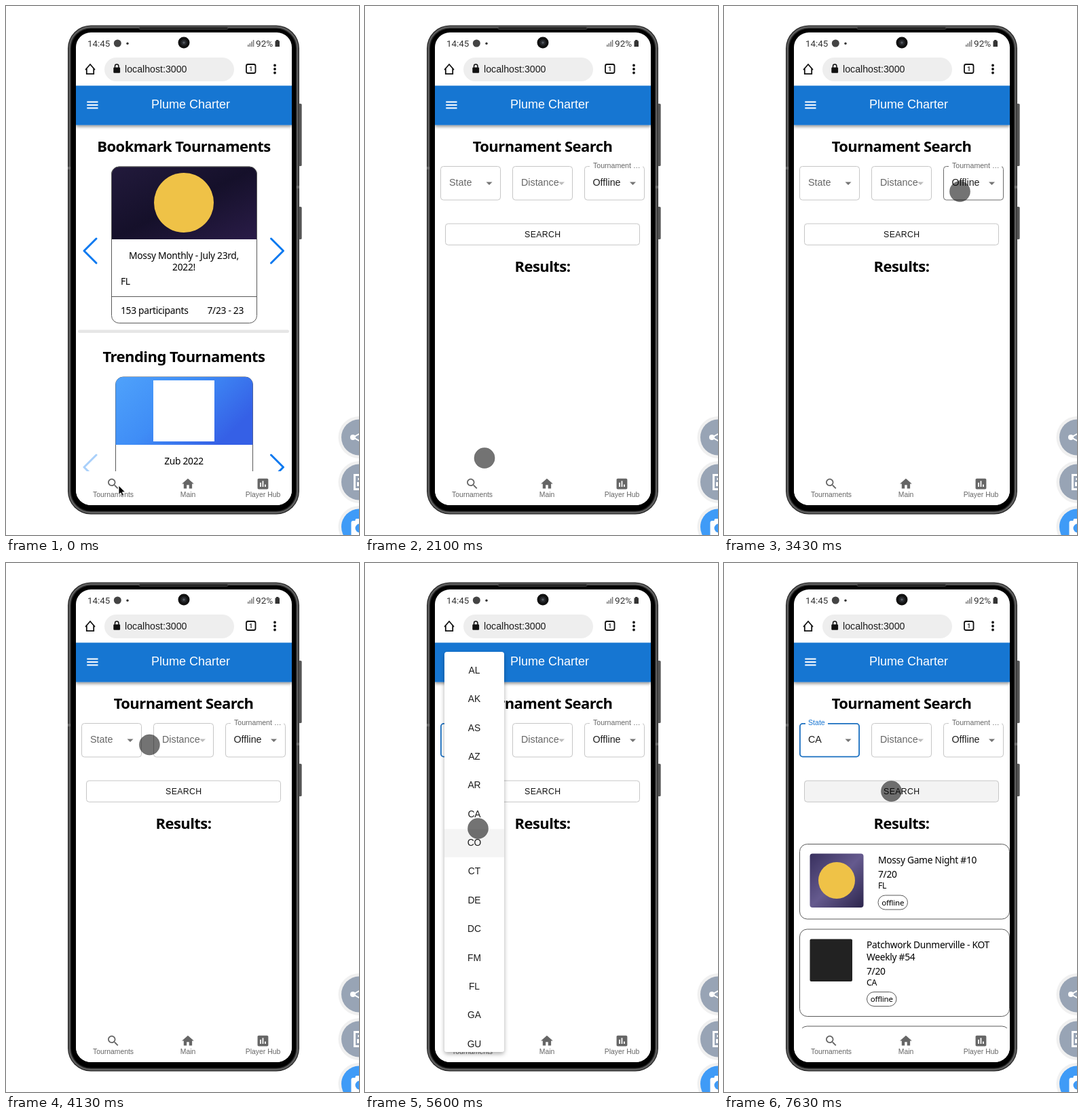
These frames come from a looping animation (520x780 px, 8 s). An HTML page:

```html
<!DOCTYPE html>
<html lang="en">
<head>
<meta charset="utf-8">
<title>Tournament search demo</title>
<style>
  html, body { margin: 0; width: 100%; height: 100%; overflow: hidden; background: #fff; }
  svg { display: block; }
  text { font-family: "Liberation Sans", Arial, sans-serif; white-space: pre; }
  .sys { font-family: Roboto, sans-serif; }
  .head { font: bold 22px "Noto Sans", sans-serif; letter-spacing: -.55px; text-anchor: middle; }
  .body { font: 13.8px "Noto Sans", sans-serif; letter-spacing: -.3px; }
  .small { font-size: 12.3px; }
  .chip { font-size: 11.5px; letter-spacing: -.2px; }
  .mid { text-anchor: middle; }
  .end { text-anchor: end; }
  .nav { font-size: 10.4px; fill: #666; text-anchor: middle; }
  .field { font-size: 14.3px; fill: #666; }
  .label { font-size: 10.6px; fill: #666; }
  .card { fill: #fff; stroke: #5a5a5a; }
  .chev { fill: none; stroke: #0a79f0; stroke-width: 3; stroke-linecap: round; stroke-linejoin: round; }
  .box { fill: none; stroke: #c6c6c6; }
</style>
</head>
<body>
<svg id="stage" width="520" height="780" viewBox="0 0 520 780">
  <defs>
    <clipPath id="screen"><rect x="103" y="39" width="318" height="697" rx="22"/></clipPath>
    <clipPath id="page"><rect x="103" y="117" width="318" height="569"/></clipPath>
    <clipPath id="cardA"><path d="M155.5 344V248a11 11 0 0 1 11-11h192a11 11 0 0 1 11 11v96z"/></clipPath>
    <clipPath id="cardB"><path d="M161.5 647V558a11 11 0 0 1 11-11h180a11 11 0 0 1 11 11v89z"/></clipPath>
    <linearGradient id="night" x1="0" y1="0" x2="1" y2="1">
      <stop offset="0" stop-color="#221a3c"/><stop offset=".5" stop-color="#15102a"/><stop offset="1" stop-color="#2a1c48"/>
    </linearGradient>
    <linearGradient id="dusk" x1="0" y1="0" x2="1" y2="1">
      <stop offset="0" stop-color="#38305e"/><stop offset=".5" stop-color="#655a8e"/><stop offset="1" stop-color="#2c254c"/>
    </linearGradient>
    <linearGradient id="sky" x1="0" y1="0" x2="1" y2=".5">
      <stop offset="0" stop-color="#4fa2fb"/><stop offset=".5" stop-color="#3f8df6"/><stop offset="1" stop-color="#3560e6"/>
    </linearGradient>
    <linearGradient id="metal" x1="0" x2="1">
      <stop offset="0" stop-color="#2b2b2b"/><stop offset=".5" stop-color="#6a6a6a"/><stop offset="1" stop-color="#333"/>
    </linearGradient>
    <filter id="drop" x="-20%" y="-20%" width="140%" height="140%">
      <feDropShadow dx="0" dy="3" stdDeviation="3" flood-opacity=".32"/>
    </filter>
    <filter id="bar" x="-5%" y="-10%" width="110%" height="140%">
      <feDropShadow dx="0" dy="2.5" stdDeviation="2" flood-opacity=".42"/>
    </filter>
  </defs>

  <g id="phone">
    <rect x="430" y="144" width="5.5" height="92" rx="1.5" fill="url(#metal)"/>
    <rect x="430" y="296" width="5.5" height="48" rx="1.5" fill="url(#metal)"/>
    <rect x="91" y="28.5" width="341" height="721" rx="34" fill="#262626"/>
    <rect x="93.5" y="31" width="336" height="716" rx="31.5" fill="none" stroke="#606060" stroke-width="2.4"/>
    <rect x="96" y="33.5" width="331" height="711" rx="29" fill="#000"/>
    <rect x="196" y="31" width="131" height="3.5" rx="1.7" fill="#222" stroke="#555" stroke-width=".6"/>
    <path d="M91 239h4M428 267h4" stroke="#888" stroke-width="4" opacity=".5"/>
    <rect x="103" y="39" width="318" height="697" rx="22" fill="#fff"/>
  </g>

  <g id="chrome" fill="#333">
    <text class="sys" x="120" y="60" font-size="13.3">14:45</text>
    <circle cx="164.3" cy="55" r="5.5" fill="#444"/>
    <circle cx="179" cy="55.3" r="1.7"/>
    <circle cx="262" cy="54" r="8.5" fill="#111"/>
    <circle cx="262" cy="54" r="4.5" fill="#26282c"/>
    <circle cx="262" cy="54" r="1.8" fill="#555a62"/>
    <path d="M356 57h1.5v3h-1.5zM358.6 55h1.5v5h-1.5zM361.2 52.5h1.5v7.500h-1.5zM363.8 50h1.5v10h-1.5z" fill="#777"/>
    <text class="sys" x="368" y="60" font-size="13.6">92%</text>
    <path d="M398 50h3.5v1.5h1.5v8.500h-6.5v-8.500h1.5z"/>
    <path d="M117.5 93.500l6.500-7.500 6.500 7.500M118.8 92v8.200h10.400V92" fill="none" stroke="#111" stroke-width="1.8" stroke-linecap="round"/>
    <rect x="145" y="76" width="191" height="35" rx="17.5" fill="#eee"/>
    <path d="M160.5 91v-2.200a2.700 2.700 0 0 1 5.400 0V91" fill="none" stroke="#111" stroke-width="1.5"/>
    <rect x="158.3" y="90.5" width="9.8" height="8.3" rx="1.2" fill="#111"/>
    <text x="175" y="98" font-size="14.2" fill="#1c1c1c">localhost:3000</text>
    <rect x="354" y="86" width="13.5" height="13" rx="2.5" fill="none" stroke="#111" stroke-width="1.8"/>
    <text class="sys mid" x="360.7" y="96" font-size="9.5" font-weight="bold">1</text>
    <path d="M396 87.500h0M396 93h0M396 98.500h0" stroke="#111" stroke-width="3.8" stroke-linecap="round"/>
  </g>

  <g clip-path="url(#page)">
    <g id="home"></g>
    <g id="search"></g>
    <g filter="url(#bar)"><rect x="103" y="117.5" width="318" height="58" fill="#1976d2"/></g>
    <path d="M119.3 141.500h16.200M119.3 146h16.200M119.3 150.500h16.200" stroke="#fff" stroke-width="1.8"/>
    <text class="mid" x="272" y="151" font-size="18" fill="#fff">Plume Charter</text>
  </g>
  <g id="nav" clip-path="url(#screen)"></g>
  <g id="menu" filter="url(#drop)"></g>

  <g id="tools"></g>
  <path id="arrow" d="M0 0V13.500L3.100 10.700 5.200 15.500 7.500 14.500 5.400 9.800H9.600Z" fill="#000" stroke="#fff" stroke-width=".9"/>
  <circle id="touch" r="15.2" fill="rgba(0,0,0,.55)" stroke="rgba(0,0,0,.12)"/>
</svg>

<script>
const $ = id => document.getElementById(id);
const LOOP = 8000, STEP = 70;
const PAGE_AT = 1260, OPEN_AT = 4550, CLOSE_AT = 6160, RESULT_AT = 6580;
const STATES = 'AL AK AS AZ AR CA CO CT DE DC FM FL GA GU'.split(' ');
const ROW = 42.35, FADE = 375, GROW = 250;

const text = (cls, x, y, s, more = '') => `<text class="${cls}" x="${x}" y="${y}" ${more}>${s}</text>`;
const rect = (x, y, w, h, r, more) => `<rect x="${x}" y="${y}" width="${w}" height="${h}" rx="${r}" ${more}/>`;
const chevron = (x, y, dir, more = '') =>
  `<path class="chev" d="M${x} ${y - 18}l${18 * dir} 18l${-18 * dir} 18" ${more}/>`;
const caret = (x, fill, id = '') => `<path ${id} d="M${x} 259.5h9l-4.5 4.5z" fill="${fill}"/>`;

$('home').innerHTML =
  text('head', 262, 215, 'Bookmark Tournaments') +
  rect(155.5, 237, 214, 230.5, 11, 'class="card"') +
  '<g clip-path="url(#cardA)">' + rect(155, 237, 215, 107, 0, 'fill="url(#night)"') +
  '<circle cx="262" cy="290" r="44" fill="#efc247"/></g>' +
  '<path d="M155.5 344V248a11 11 0 0 1 11-11h192a11 11 0 0 1 11 11v96M155.5 428.5h214" fill="none" stroke="#5a5a5a"/>' +
  text('body mid', 262, 373, 'Mossy Monthly - July 23rd,') +
  text('body mid', 262, 390, '2022!') +
  text('body', 169, 411, 'FL') +
  text('body', 169, 453.5, '153 participants') +
  text('body end', 350, 453.5, '7/23 - 23') +
  chevron(133, 361, -1) + chevron(390.5, 361, 1) +
  rect(106, 477.5, 311, 4.5, 2, 'fill="#e6e6e6"') +
  text('head', 262, 524.5, 'Trending Tournaments') +
  rect(161.5, 547, 202, 230, 11, 'class="card"') +
  '<g clip-path="url(#cardB)">' + rect(161, 547, 203, 100, 0, 'fill="url(#sky)"') +
  rect(217, 552, 90, 90, 0, 'fill="#fff"') + '</g>' +
  text('body mid', 262, 676, 'Zub 2022') +
  chevron(133, 680, -1, 'opacity=".35"') + chevron(390.5, 680, 1);

const chip = (x, y) => rect(x, y, 43.5, 21, 10.5, 'class="card"') + text('body chip mid', x + 21.7, y + 14.5, 'offline');

const results =
  rect(111.5, 414.5, 309, 110.5, 11, 'class="card"') +
  rect(126.5, 428.5, 79, 79.5, 4, 'fill="url(#dusk)"') +
  '<circle cx="166" cy="468" r="27" fill="#efc247"/>' +
  text('body', 227, 443, 'Mossy Game Night #10') +
  text('body', 227, 464, '7/20') + text('body small', 227, 479.5, 'FL') + chip(227, 490) +
  rect(111.5, 540, 309, 128.5, 11, 'class="card"') +
  rect(126.5, 554.5, 62.5, 62.5, 2, 'fill="#222"') +
  text('body', 210, 568, 'Patchwork Dunmerville - KOT') +
  text('body', 210, 585.5, 'Weekly #54') +
  text('body', 210, 607, '7/20') + text('body small', 210, 622.5, 'CA') + chip(210.5, 632.5) +
  rect(111.5, 683, 309, 110, 11, 'class="card"');

$('search').innerHTML =
  text('head', 261.5, 215, 'Tournament Search') +
  [111.5, 217.5, 323.5].map((x, i) => rect(x, 236.5, 88, 49.5, 4, `class="box" id="field${i}"`)).join('') +
  rect(111.9, 236.9, 87.2, 48.7, 4, 'id="ring" fill="none" stroke="#1a6fc0" stroke-width="1.8"') +
  rect(331, 234, 78, 5, 0, 'fill="#fff"') +
  text('label', 336, 239, 'Tournament …') +
  `<g id="notch">${rect(120, 234, 33, 5, 0, 'fill="#fff"')}${text('label', 124, 239, 'State', 'style="fill:#1976d2"')}</g>` +
  text('field', 124, 265, 'State', 'id="state"') +
  text('field', 230, 265, 'Distance') +
  text('field', 335.5, 265, 'Offline', 'style="fill:#1c1c1c"') +
  caret(178.5, '#757575', 'id="caret"') + caret(285, '#bdbdbd') + caret(390, '#757575') +
  rect(118.5, 321, 286, 31.3, 4, 'class="box" id="button"') +
  text('mid', 261.8, 341, 'SEARCH', 'font-size="12.3" letter-spacing=".35" fill="#111"') +
  text('head', 261.5, 391.5, 'Results:') +
  `<g id="results">${results}</g>`;

const ICONS = [
  [158, 'Tournaments', 'M15.5 14h-.79l-.28-.27C15.41 12.59 16 11.11 16 9.5 16 5.91 13.09 3 9.5 3S3 5.91 3 9.5 5.91 16 9.5 16c1.61 0 3.09-.59 4.23-1.57l.27.28v.79l5 4.99L20.49 19l-4.99-5zm-6 0C7.01 14 5 11.99 5 9.5S7.01 5 9.5 5 14 7.01 14 9.5 11.99 14 9.5 14z'],
  [268, 'Main', 'M10 20v-6h4v6h5v-8h3L12 3 2 12h3v8z'],
  [378.5, 'Player Hub', 'M19 3H5c-1.1 0-2 .9-2 2v14c0 1.1.9 2 2 2h14c1.1 0 2-.9 2-2V5c0-1.1-.9-2-2-2zM9 17H7v-7h2v7zm4 0h-2V7h2v10zm4 0h-2v-4h2v4z'],
];
$('nav').innerHTML = rect(103, 686, 318, 50, 0, 'fill="#fff"') + ICONS.map(([x, name, d]) =>
  `<path transform="translate(${x - 10.6} 694) scale(.88)" fill="#666" d="${d}"/>` + text('nav', x, 723.5, name)).join('');

$('menu').innerHTML =
  rect(117, 131, 88, 590, 4, 'fill="#fff"') +
  rect(117, 0, 88, ROW - 1, 0, 'id="hover" fill="#f4f4f4"') +
  STATES.map((s, i) => text('mid', 161, 163 + i * ROW, s, 'font-size="13.8" fill="#1c1c1c"')).join('');

$('tools').innerHTML = [[636, '#98a4b5'], [702, '#98a4b5'], [768, '#3f9bf7']].map(([y, c]) =>
    `<circle cx="520.5" cy="${y}" r="31" fill="#f0f0f0"/><circle cx="520.5" cy="${y}" r="26.5" fill="${c}"/>`).join('') +
  '<circle cx="511" cy="636" r="4" fill="#fff"/><path d="M524 629l-13 7 13 7" fill="none" stroke="#fff" stroke-width="2"/>' +
  '<path d="M530 691.5h-16.5v21H530M518.5 697.5h8" fill="none" stroke="#fff" stroke-width="3"/>' +
  rect(517, 702, 8, 6, 0, 'fill="#fff"') +
  rect(508.5, 759, 25, 24, 3, 'fill="#fff"') + rect(514.5, 756, 13, 6, 2, 'fill="#fff"') +
  '<circle cx="521" cy="770" r="6.5" fill="#3f9bf7"/>';

const ease = {
  lin: u => u,
  in: u => u * u,
  out: u => u * (2 - u),
  both: u => u < .5 ? 2 * u * u : 1 - 2 * (1 - u) ** 2,
};

// time, x, y, easing on the way there
const PATH = [
  [0, 166, 707], [210, 160, 712, 'both'], [489, 160, 712], [490, 159.5, 711.5], [560, 160.5, 711],
  [1750, 160.5, 711], [2660, 265.5, 410.5, 'in'], [3430, 347.5, 273.5, 'out'],
  [3710, 347.5, 273.5], [4340, 172.5, 266.5, 'both'], [4800, 172.5, 266.5],
  [5390, 168.5, 397.5, 'both'], [5530, 168.5, 397.5], [5600, 166.5, 391.5],
  [5880, 162.5, 377, 'out'], [6300, 162.5, 377], [7070, 248, 336.5, 'both'],
  [7560, 248, 336.5], [7630, 246.5, 336.5], [LOOP, 246.5, 336.5],
];

function pointer(t) {
  const i = PATH.findIndex(p => p[0] > t);
  const [t0, x0, y0] = PATH[i - 1], [t1, x1, y1, kind = 'lin'] = PATH[i];
  const k = ease[kind]((t - t0) / (t1 - t0));
  return [x0 + (x1 - x0) * k, y0 + (y1 - y0) * k];
}

// cubic-bezier(.4, 0, .2, 1)
function standard(x) {
  if (x <= 0) return 0;
  if (x >= 1) return 1;
  let lo = 0, hi = 1;
  for (let n = 0; n < 24; n++) {
    const s = (lo + hi) / 2, r = 1 - s;
    if (1.2 * s * r * r + .6 * s * s * r + s ** 3 < x) lo = s; else hi = s;
  }
  return 3 * lo * lo * (1 - lo) + lo ** 3;
}

const show = (id, on) => { $(id).style.display = on ? '' : 'none'; };
const inside = (x, y, l, t, w, h) => x > l && x < l + w && y > t && y < t + h;

function drawMenu(t, y) {
  const closing = t >= CLOSE_AT, age = t - (closing ? CLOSE_AT : OPEN_AT);
  const fade = standard(age / FADE), grow = standard((closing ? age - FADE / 3 : age) / GROW);
  const alpha = closing ? 1 - fade : fade, k = closing ? 1 - grow : grow;
  show('menu', t >= OPEN_AT && alpha > 0);
  $('menu').setAttribute('opacity', alpha);
  $('menu').setAttribute('transform',
    `translate(161 277) scale(${.75 + .25 * k} ${.5625 + .4375 * k}) translate(-161 -277)`);
  const row = Math.floor((y - 136.8) / ROW);
  $('hover').setAttribute('y', 138.3 + row * ROW);
  show('hover', t > 4870 && t < CLOSE_AT + 280);
}

function draw(t) {
  const [x, y] = pointer(t), touch = t >= 490, onSearch = t >= PAGE_AT;
  show('arrow', !touch);
  show('touch', touch);
  $(touch ? 'touch' : 'arrow').setAttribute('transform', `translate(${x} ${y})`);
  show('home', !onSearch);
  show('search', onSearch);
  show('results', t >= RESULT_AT);

  const focus = t >= OPEN_AT, chosen = t >= CLOSE_AT;
  const over = left => inside(x, y, left, 236, 88, 50);
  show('field0', !focus);
  show('ring', focus);
  show('notch', focus);
  show('state', !focus || chosen);
  $('field0').style.stroke = over(111.5) ? '#6b6b6b' : '';
  $('field2').style.stroke = over(323.5) ? '#6b6b6b' : '';
  $('state').textContent = chosen ? 'CA' : 'State';
  $('state').style.fill = chosen ? '#1c1c1c' : '';
  $('caret').setAttribute('transform', focus && !chosen ? 'rotate(180 183 261.75)' : '');
  $('button').style.fill = chosen && inside(x, y, 118, 321, 286, 31) ? '#f3f3f3' : '';
  drawMenu(t, y);
}

const start = performance.now();
function tick() {
  const t = (performance.now() - start) % LOOP;
  draw(Math.floor(t / STEP) * STEP);
  requestAnimationFrame(tick);
}
tick();
</script>
</body>
</html>
```
